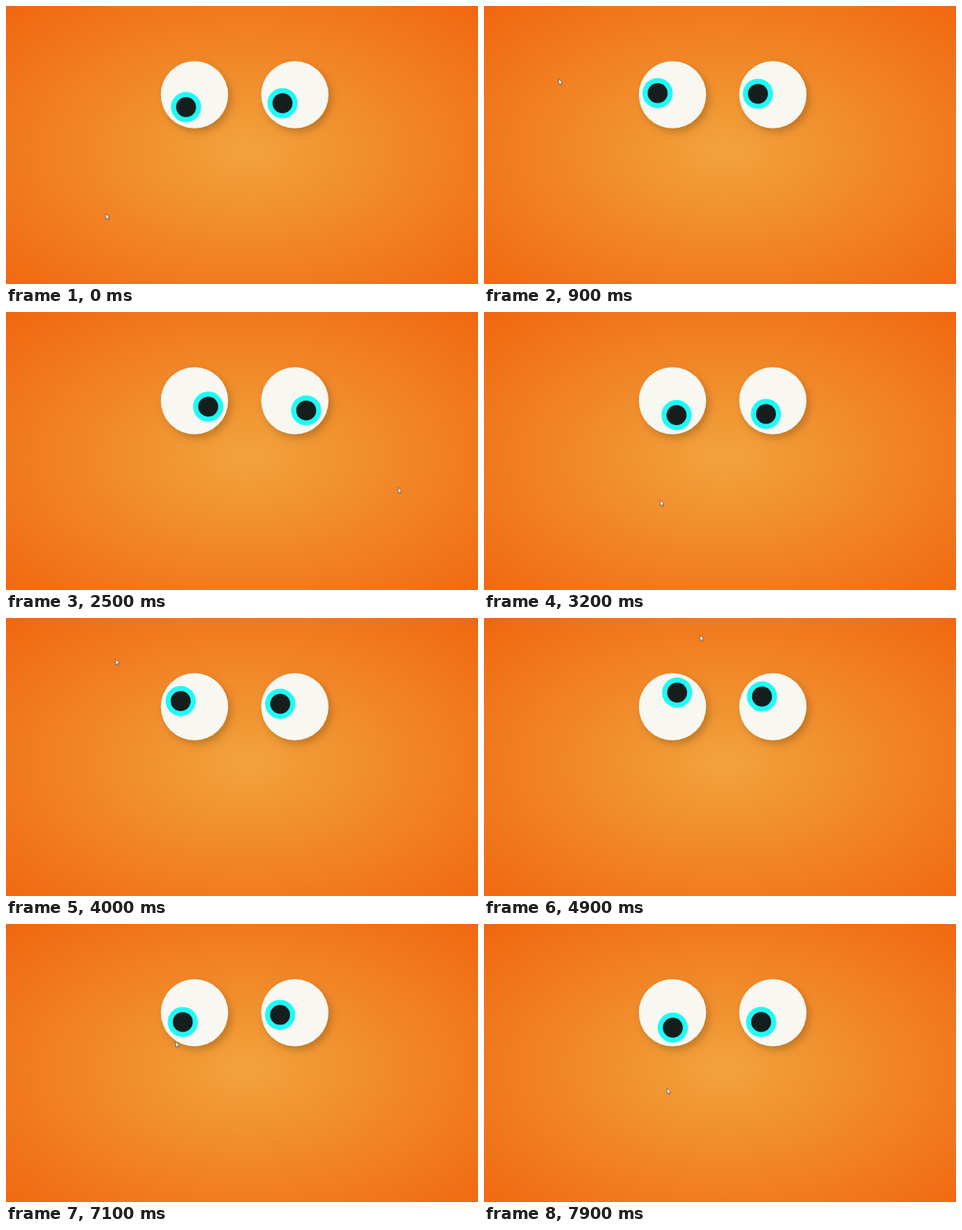
These frames come from a looping animation (600 px wide and 354 px high, 8 s). An HTML page:

```html
<!DOCTYPE html>
<html lang="en">
<head>
<meta charset="utf-8">
<title>Watching eyes</title>
<style>
  html, body { margin: 0; width: 100%; height: 100%; overflow: hidden; }
  body { background: radial-gradient(ellipse farthest-corner at 51% 52%, #f1a33d, #f1660f); }
  svg { display: block; }
  .ball { fill: #f8f7f1; filter: drop-shadow(4px 5px 5px rgba(60, 30, 0, .25)); }
</style>
</head>
<body>
<svg width="600" height="354">
  <defs>
    <g id="iris"><circle r="19.2" fill="#1ffaf6"/><circle r="12.7" fill="#151e1d"/></g>
  </defs>
  <circle class="ball" cx="239.6" cy="113" r="42.8"/>
  <circle class="ball" cx="367.2" cy="113" r="42.8"/>
  <use class="iris" href="#iris"/>
  <use class="iris" href="#iris"/>
  <path id="cursor" d="M.4 .4V7.6L2 6.2L3.2 8.8L4.4 8.3L3.2 5.8H5.4Z"
        fill="#fff" stroke="#4a3a30" stroke-width=".6"/>
</svg>
<script>
const LOOP = 8000, STEP = 100, REACH = 19;
const EYE_Y = 113, EYES_X = [239.6, 367.2];

// Pointer positions every SPAN ms, the first one SPAN before the start
const SPAN = 500;
const path = [
  [128, 280], [126.5, 264], [79, 140], [110, 100], [266, 285], [413, 268],
  [498, 223], [335, 291], [78, 130], [139, 52], [246, 25], [280, 22],
  [315, 32], [317, 104], [290, 98], [212, 135], [262, 212], [226, 206.5]
];

// Catmull-Rom curve through the path
function pointer(t) {
  const s = t / SPAN + 1, i = Math.floor(s), u = s - i;
  const at = n => path[Math.min(Math.max(n, 0), path.length - 1)];
  return [0, 1].map(k => {
    const [a, b, c, d] = [-1, 0, 1, 2].map(n => at(i + n)[k]);
    return b + u / 2 * (c - a + u * (2 * a - 5 * b + 4 * c - d + u * (3 * (b - c) + d - a)));
  });
}

const irises = document.querySelectorAll(".iris");
const cursor = document.getElementById("cursor");
const place = (node, x, y) => node.setAttribute("transform", `translate(${x} ${y})`);

function draw(now) {
  const t = Math.floor(now % LOOP / STEP) * STEP;
  place(cursor, ...pointer(t));

  // The gaze trails the pointer by one step
  const [gx, gy] = pointer(t - STEP);
  irises.forEach((iris, i) => {
    const angle = Math.atan2(gy - EYE_Y, gx - EYES_X[i]);
    place(iris, EYES_X[i] + REACH * Math.cos(angle), EYE_Y + REACH * Math.sin(angle));
  });
}

function loop() {
  draw(performance.now());
  requestAnimationFrame(loop);
}
loop();
</script>
</body>
</html>
```
